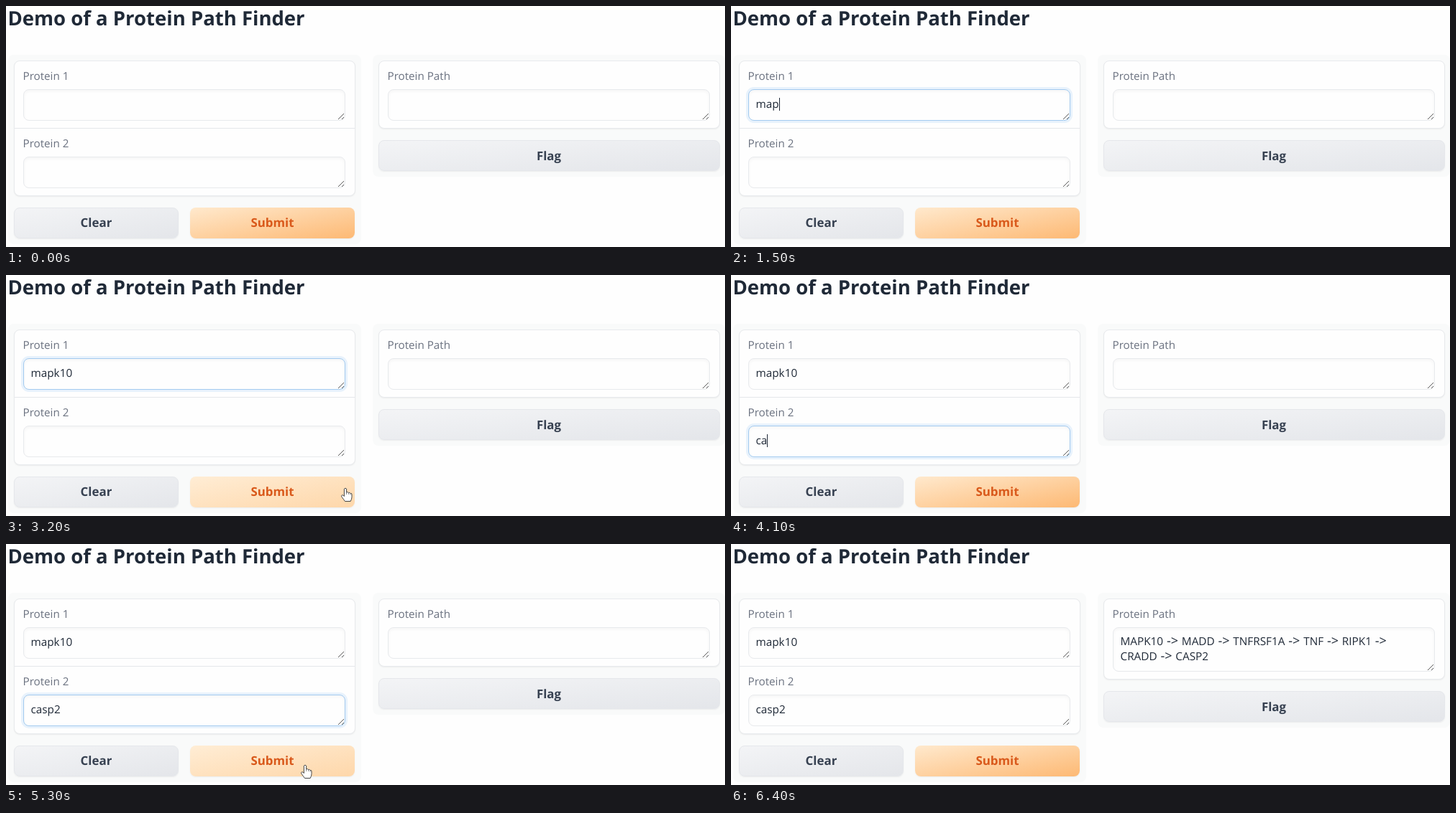
Recreate the animation shown at these times as an HTML page. Size 1000 by 336 pixels, loop 8000 ms.

```html
<!DOCTYPE html>
<html lang="en">
<head>
<meta charset="utf-8">
<title>Protein Path Finder</title>
<style>
  html, body { margin: 0; width: 100%; height: 100%; overflow: hidden; background: #fefefe; }
  #stage { position: relative; width: 1000px; height: 336px; overflow: hidden; }
  #stage div { position: absolute; box-sizing: border-box; }
  .panel { background: #f9fafa; border-radius: 8px; }
  .card { background: #fefefe; border: 1px solid #e8eaed; border-radius: 8px; box-shadow: 0 1px 2px rgba(0,0,0,.06); }
  .rule { background: #e5e7eb; }
  .field { background: #fefefe; border: 1px solid #e8eaed; border-radius: 8px; box-shadow: inset 0 2px 4px rgba(0,0,0,.04); }
  .field.focus { border-color: #a3cbf0; box-shadow: 0 0 0 3px #e8f2fc, inset 0 2px 4px rgba(0,0,0,.04); }
  .button { border: 1px solid #e5e7eb; border-radius: 8px; background: linear-gradient(to bottom right, #f3f4f6, #e4e6ea); box-shadow: 0 1px 2px rgba(0,0,0,.06); }
  .primary { border: 0; background: linear-gradient(to bottom right, #ffe9cd, #fdb974); }
  .primary.hover { background: linear-gradient(to bottom right, #ffedd5, #fed7aa); }
  svg { position: absolute; left: 0; top: 0; }
  text { font: 15.3px "Open Sans", "Noto Sans", sans-serif; fill: #1f2937; white-space: pre; text-rendering: geometricPrecision; }
  .title { font-size: 27.5px; font-weight: 700; }
  .label { font-size: 15.2px; fill: #6b7280; }
  .action { font-size: 16.9px; font-weight: 700; fill: #374151; text-anchor: middle; }
  .result { word-spacing: .85px; }
  .arrow { font-size: 18px; }
</style>
</head>
<body>
<div id="stage"></div>
<script>
const LOOP = 8000;
const GROWTH = 18;
const stage = document.getElementById("stage");

function box(className, x, y, width, height) {
  const el = document.createElement("div");
  el.className = className;
  Object.assign(el.style, { left: x + "px", top: y + "px", width: width + "px", height: height + "px" });
  stage.append(el);
  return el;
}

box("panel", 3, 68, 491, 264);
const outPanel = box("panel", 510, 68, 490, 170);
box("card", 11, 76, 475, 189);
box("rule", 12, 170, 473, 1);
const outCard = box("card", 518, 76, 475, 95);
const fields = [box("field", 24, 116, 448, 44), box("field", 24, 210, 448, 44)];
const outField = box("field", 531, 116, 448, 44);
box("button", 11, 281, 229, 43);
const submit = box("button primary", 256, 281, 229, 43);
const flag = box("button", 518, 187, 475, 43);

function svgNode(tag, attrs, parent, content = "") {
  const el = document.createElementNS("http://www.w3.org/2000/svg", tag);
  for (const name in attrs) el.setAttribute(name, attrs[name]);
  el.textContent = content;
  parent.append(el);
  return el;
}

const svg = svgNode("svg", { width: 1000, height: 336, viewBox: "0 0 1000 336" }, stage);
const label = (className, x, y, content) => svgNode("text", { class: className, x, y }, svg, content);
const grip = (x, y) => svgNode("path", {
  d: `M${x - 9} ${y - 1}l8 -8M${x - 4} ${y - 1}l3 -3`, stroke: "#5a5a5a", "stroke-width": 1, fill: "none"
}, svg);

function resultLine(y, content) {
  const line = label("result", 541.5, y, "");
  for (const part of content.split(/(->)/)) {
    svgNode("tspan", { class: part === "->" ? "arrow" : "" }, line, part);
  }
  return line;
}

label("title", 2.5, 27, "Demo of a Protein Path Finder");
label("label", 23.5, 103, "Protein 1");
label("label", 23.5, 197, "Protein 2");
label("label", 530.5, 103, "Protein Path");
label("action", 125.5, 308, "Clear");
label("action", 370.5, 308, "Submit").style.fill = "#d9591b";
const flagText = label("action", 755, 215, "Flag");
const typed = [label("", 34.5, 142, ""), label("", 34.5, 236, "")];
const results = [
  resultLine(140.5, "MAPK10 -> MADD -> TNFRSF1A -> TNF -> RIPK1 ->"),
  resultLine(161.5, "CRADD -> CASP2")
];
grip(471, 159);
grip(471, 253);
const outGrip = grip(978, 159);
const caret = svgNode("rect", { width: 1, height: 18, fill: "#1f2937" }, svg);

// Hand pointer, with its fingertip at the origin
const pointer = svgNode("g", {}, svg);
svgNode("path", {
  d: "M-1.6 1.2Q0 -.8 1.6 1.2V6Q3.4 5 4.6 6.5Q6.2 5.8 7 7.4Q9 7 9 9V12.5Q9 15 7.2 18.5H-.6" +
     "Q-2.5 15.5 -5 12.4Q-6.2 10.2 -4.4 9.8Q-3 9.6 -1.6 11.6Z",
  fill: "#fff", stroke: "#444", "stroke-width": 1, "stroke-linejoin": "round"
}, pointer);
svgNode("path", { d: "M1.6 6V9M4.6 6.5V9M7 7.4V9.5", stroke: "#666", "stroke-width": .8 }, pointer);

// Each track lists [start time, value]; the value holds until the next start
const tracks = {
  first: [[0, ""], [1300, "ma"], [1500, "map"], [1900, "mapk"], [2100, "mapk1"], [2200, "mapk10"]],
  second: [[0, ""], [3600, "c"], [4100, "ca"], [4200, "cas"], [4500, "casp"], [4800, "casp2"]],
  focus: [[0, -1], [500, 0], [3400, 1], [5700, -1]],
  caret: [[0, false], [500, true], [1100, false], [1300, true], [2800, false], [3400, true], [5300, false]],
  pointer: [[0, null], [3100, [479, 314]], [3200, [472, 297]], [3300, null], [5300, [416, 308]],
    [5500, [400, 303]], [6300, [404, 309]], [6400, null]],
  done: [[0, false], [5900, true]]
};
const valueAt = (track, t) => track.findLast(([start]) => start <= t)[1];
const show = (el, on) => el.setAttribute("visibility", on ? "visible" : "hidden");

function render(t) {
  const now = {};
  for (const name in tracks) now[name] = valueAt(tracks[name], t);

  typed[0].textContent = now.first;
  typed[1].textContent = now.second;
  fields.forEach((field, i) => field.classList.toggle("focus", i === now.focus));

  show(caret, now.caret);
  if (now.caret) {
    const text = typed[now.focus];
    caret.setAttribute("x", Math.round(34.5 + text.getComputedTextLength()));
    caret.setAttribute("y", now.focus ? 222 : 128);
  }

  show(pointer, now.pointer);
  if (now.pointer) pointer.setAttribute("transform", `translate(${now.pointer})`);
  submit.classList.toggle("hover", now.pointer !== null);

  const grow = now.done ? GROWTH : 0;
  outPanel.style.height = 170 + grow + "px";
  outCard.style.height = 95 + grow + "px";
  outField.style.height = 44 + grow + "px";
  flag.style.top = 187 + grow + "px";
  for (const el of [flagText, outGrip]) el.setAttribute("transform", `translate(0 ${grow})`);
  results.forEach(line => show(line, now.done));
}

const start = performance.now();
function tick() {
  render((performance.now() - start) % LOOP);
  requestAnimationFrame(tick);
}
render(0);
requestAnimationFrame(tick);
</script>
</body>
</html>
```
